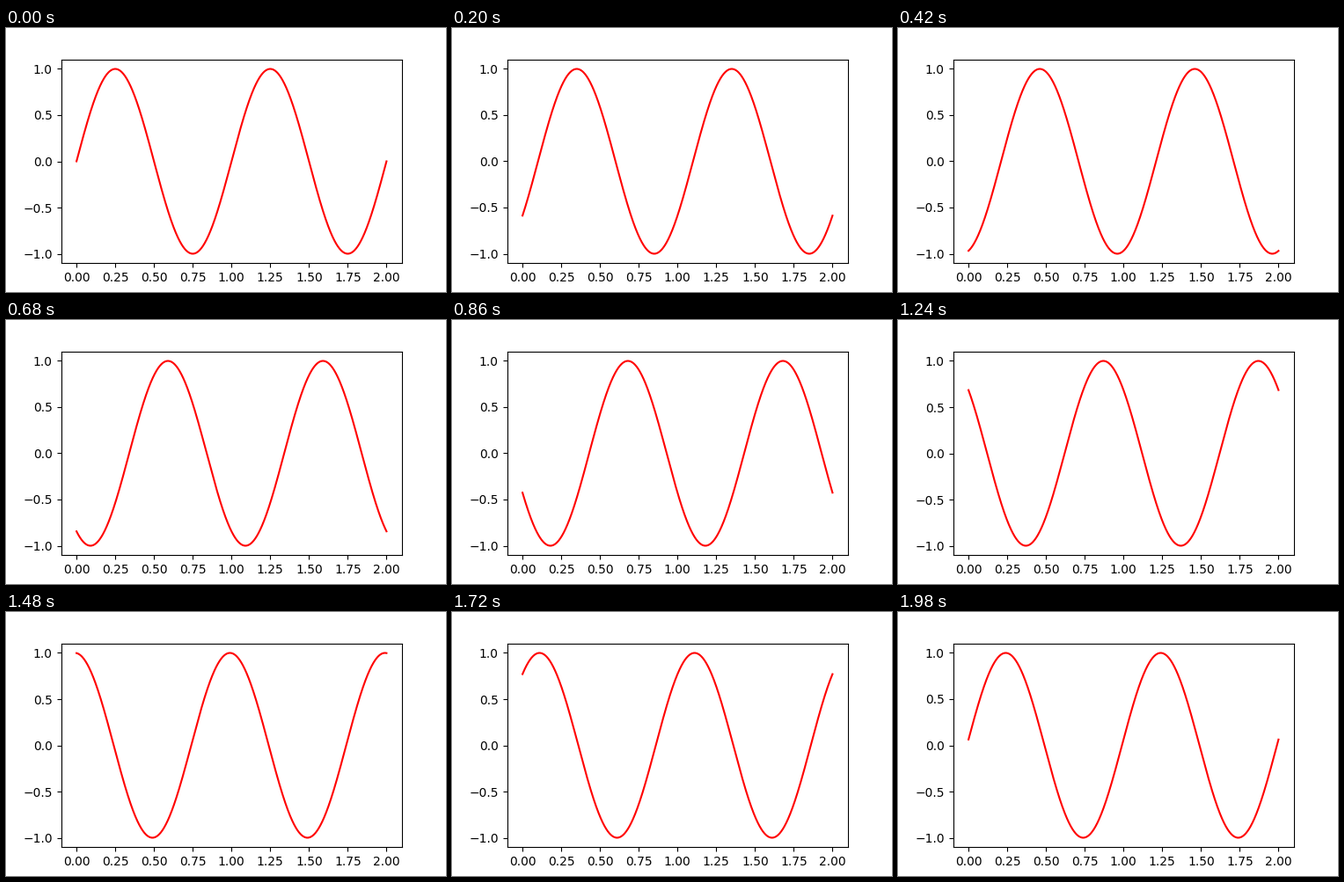
Animation of 500 by 300 pixels, one loop 2 s. Source, as a matplotlib script:

```python
import matplotlib.pyplot as plt
import numpy as np
from matplotlib.animation import FuncAnimation

FRAMES = 100
INTERVAL = 20  # ms

fig, ax = plt.subplots(figsize=(5, 3), dpi=100)
x = np.linspace(0, 2, 1000)
line, = ax.plot(x, np.sin(2 * np.pi * x), "r")


def update(i):
    """Shift the wave right by one percent of its period per frame."""
    line.set_data(x, np.sin(2 * np.pi * (x - 0.01 * i)))
    # Limits follow the sampled extremes of each frame
    ax.relim()
    ax.autoscale_view()
    return line,


anim = FuncAnimation(fig, update, frames=FRAMES, interval=INTERVAL,
                     repeat=True, repeat_delay=0)
plt.show()
```
